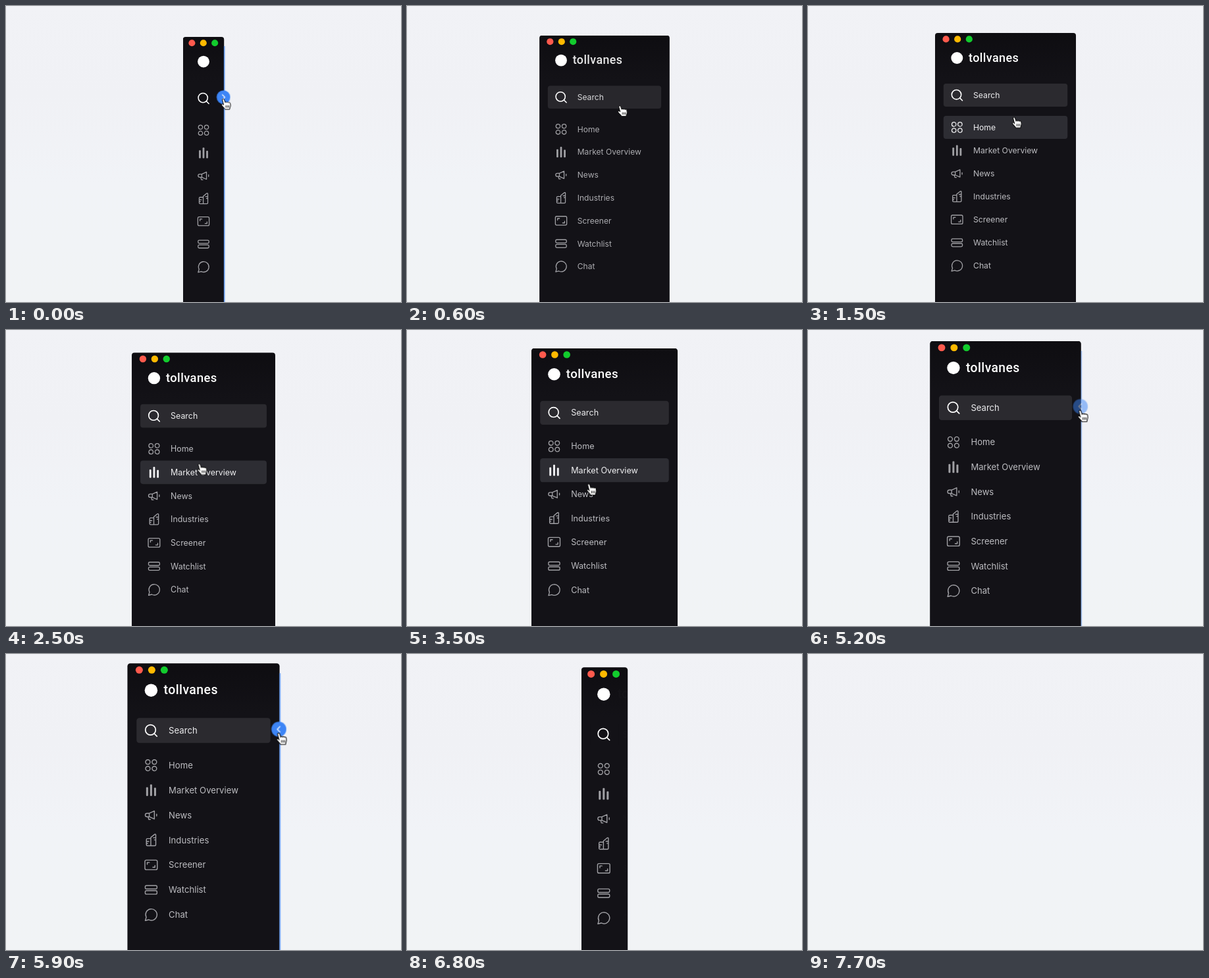
Write an HTML page that moves like this. It is 600 px wide and 450 px high and loops after 8 s.

```html
<!DOCTYPE html>
<html lang="en">
<head>
<meta charset="utf-8">
<title>Collapsible sidebar</title>
<style>
/* --p: how far the sidebar is open, --h: how strongly a row is hovered */
@property --p { syntax: '<number>'; inherits: true; initial-value: 0; }
@property --h { syntax: '<number>'; inherits: true; initial-value: 0; }

html, body { margin: 0; width: 100%; height: 100%; overflow: hidden; }
body { background: linear-gradient(#f1f2f6, #f0f1f5 30%, #f1f3f7 60%, #f1f3f5); }
svg { display: block; width: 600px; height: 450px; animation: open 8s infinite; }
.drop { animation: drop 8s infinite; }
.cam { animation: cam 8s linear infinite; }
.side { transform: translateX(calc(-1px * (31.6 + 75.4 * var(--p)))); }
.panel { width: calc(1px * (63.2 + 150.8 * var(--p))); height: 700px; }
.lights { transform: translateX(calc(1px * (13.8 + 2.8 * var(--p)))); }
.icon { transform: translateX(calc(1px * (31.6 + 1.7 * var(--p)))); }
.line { fill: none; stroke: currentColor; stroke-width: 1.3; stroke-linecap: round; stroke-linejoin: round; }
.solid { fill: currentColor; }
text { fill: currentColor; font: 400 12.2px Inter, 'Open Sans', sans-serif; opacity: var(--p); }
.brand { font: 500 18px Roboto, 'Liberation Sans', sans-serif; letter-spacing: .4px; }
.bar { x: 12.8px; y: -17.5px; width: calc(1px * (37.6 + 150.8 * var(--p))); height: 35px; rx: 4px; fill: #2b2a2f; opacity: var(--p); }
.row { transform: translateY(var(--y)); color: #bcbcc0; }
.row .bar { fill: #2d2d33; opacity: calc(var(--h) * var(--p)); }
.row .icon { opacity: calc(.84 + .16 * var(--h)); }
.search { transform: translateY(94.5px); color: #fff; }
.search text { fill: #ececee; }
.home { animation: home 8s linear infinite; }
.market { animation: market 8s linear infinite; }
.news { animation: news 8s linear infinite; }
.edge { transform: translateX(calc(1px * (62.2 + 150.8 * var(--p)))); animation: edge 8s linear infinite; }
.chevron { animation: flip 8s step-end infinite; }
.hand { animation: hand 8s ease-in-out infinite; }

@keyframes open {
  0%, 1.25% { --p: 0; animation-timing-function: ease; }
  11.25%, 76.6% { --p: 1; animation-timing-function: ease; }
  86.6%, 100% { --p: 0; }
}
@keyframes drop {
  0%, 83.125% { transform: translateY(0); animation-timing-function: cubic-bezier(.65, 0, .35, 1); }
  97.5%, 100% { transform: translateY(440px); }
}
@keyframes cam {
  0% { transform: translate(300px, 47px) scale(.988); }
  11.25% { transform: translate(300px, 43.8px) scale(.9945); }
  18.75% { transform: translate(300px, 41px) scale(1); }
  22.5% { transform: translate(300px, 38.5px) scale(1.006); }
  33.75% { transform: translate(300px, 33.3px) scale(1.022); }
  43.75% { transform: translate(300px, 27.8px) scale(1.038); }
  57.5% { transform: translate(300px, 20px) scale(1.0638); }
  67.5% { transform: translate(300px, 15.7px) scale(1.076); }
  73.75% { transform: translate(300px, 14.2px) scale(1.08); }
  80% { transform: translate(300px, 13.4px) scale(1.08); }
  85%, 100% { transform: translate(300px, 13.2px) scale(1.077); }
}
@keyframes home {
  0%, 9% { --h: 0; color: #bcbcc0; }
  11%, 24% { --h: 1; color: #f0f0f2; }
  26%, 100% { --h: 0; color: #bcbcc0; }
}
@keyframes market {
  0%, 25% { --h: 0; color: #bcbcc0; }
  27%, 44.3% { --h: 1; color: #f0f0f2; }
  46%, 100% { --h: 0; color: #bcbcc0; }
}
@keyframes news {
  0%, 45% { --h: 0; color: #bcbcc0; }
  46.5%, 57.8% { --h: 1; color: #f0f0f2; }
  59.5%, 100% { --h: 0; color: #bcbcc0; }
}
@keyframes edge {
  0%, 3% { opacity: 1; }
  6%, 64% { opacity: 0; }
  66%, 76.6% { opacity: 1; }
  80%, 100% { opacity: 0; }
}
@keyframes flip {
  0% { transform: scaleX(1); }
  10%, 100% { transform: scaleX(-1); }
}
@keyframes hand {
  0%, 2% { transform: translate(330px, 141.5px) scale(.99); }
  14% { transform: translate(314px, 166px) scale(1); animation-timing-function: linear; }
  18.75% { transform: translate(313px, 169.5px) scale(1); animation-timing-function: ease-in; }
  25% { transform: translate(306px, 185px) scale(1.01); animation-timing-function: linear; }
  32% { transform: translate(292px, 206px) scale(1.02); animation-timing-function: linear; }
  40% { transform: translate(280px, 218px) scale(1.03); animation-timing-function: ease-in; }
  43.75% { transform: translate(276px, 234.5px) scale(1.04); animation-timing-function: ease-out; }
  47% { transform: translate(275px, 243px) scale(1.04); }
  53.5% { transform: translate(278px, 243px) scale(1.05); animation-timing-function: ease-in; }
  57.5% { transform: translate(370px, 201.5px) scale(1.06); animation-timing-function: ease-out; }
  66%, 76% { transform: translate(414px, 120.5px) scale(1.08); opacity: 1; }
  78.75% { transform: translate(408px, 124px) scale(1.08); opacity: 1; }
  82%, 100% { transform: translate(395px, 132px) scale(1.08); opacity: 0; }
}
</style>
</head>
<body>
<svg viewBox="0 0 600 450">
  <defs>
    <clipPath id="clip"><rect class="panel"/></clipPath>
    <linearGradient id="shade" gradientUnits="userSpaceOnUse" x1="0" y1="0" x2="0" y2="70">
      <stop stop-color="#0e0d11"/><stop offset="1" stop-color="#131217"/>
    </linearGradient>
  </defs>
  <g class="drop"><g class="cam"><g class="side">
    <rect class="panel" rx="4" fill="url(#shade)"/>
    <g clip-path="url(#clip)">
      <g class="lights">
        <circle cy="9.4" r="5.1" fill="#ff5a4d"/>
        <circle cx="17.6" cy="9.4" r="5.1" fill="#ffb900"/>
        <circle cx="35.2" cy="9.4" r="5.1" fill="#12cc2d"/>
      </g>
      <g color="#fff">
        <g class="icon"><circle class="solid" cy="38" r="9"/></g>
        <text class="brand" x="51" y="43.6">tollvanes</text>
      </g>
      <g class="search">
        <rect class="bar"/>
        <g class="icon line" style="stroke-width:1.6"><circle cx="-.8" cy="-.8" r="7.2"/><path d="M4.4 4.4 8.2 8.2"/></g>
        <text x="58" y="4.4">Search</text>
      </g>
      <g class="row home" style="--y:143.5px">
        <rect class="bar"/>
        <g class="icon line">
          <circle cx="-4.6" cy="-4.6" r="3.2"/><circle cx="4.6" cy="-4.6" r="3.2"/>
          <circle cx="-4.6" cy="4.6" r="3.2"/><circle cx="4.6" cy="4.6" r="3.2"/>
        </g>
        <text x="58" y="4.4">Home</text>
      </g>
      <g class="row market" style="--y:178.6px">
        <rect class="bar"/>
        <g class="icon solid">
          <rect x="-7" y="-4.3" width="2.8" height="12.5" rx="1"/>
          <rect x="-1.4" y="-8.2" width="2.8" height="16.4" rx="1"/>
          <rect x="4.2" y="-3.6" width="2.8" height="11.8" rx="1"/>
        </g>
        <text x="58" y="4.4">Market Overview</text>
      </g>
      <g class="row news" style="--y:213.7px">
        <rect class="bar"/>
        <g class="icon line">
          <path d="M-2.6 -2.6 4.6 -5.8V5.4L-2.6 2.3ZM-2.6 -2.6H-5.8a2.4 2.4 0 0 0 0 4.9H-2.6V-2.6M-4.2 2.5-3.2 6h2.2M7.8 -1.4V1.2"/>
        </g>
        <text x="58" y="4.4">News</text>
      </g>
      <g class="row" style="--y:248.7px">
        <g class="icon line">
          <path d="M-.4 8H-5.2q-1.4 0-1.4-1.4V-.6Q-6.6 -2-5.2 -2H-.4ZM-.4 8V-3.6L5 -8q1.6-.6 1.6 1V6.6Q6.6 8 5.2 8ZM-6.4 2h3.2M-6.4 4.8h1.6M6.4 -3.2H3.2M6.4 -.2H4.6"/>
        </g>
        <text x="58" y="4.4">Industries</text>
      </g>
      <g class="row" style="--y:283.7px">
        <g class="icon line">
          <rect x="-8.7" y="-6.7" width="17.4" height="13.4" rx="2"/>
          <path d="M-5.4 -.8V-3.4H-2.4M5.4 .8V3.4H2.4"/>
        </g>
        <text x="58" y="4.4">Screener</text>
      </g>
      <g class="row" style="--y:318.8px">
        <g class="icon line">
          <rect x="-8.3" y="-6" width="16.6" height="4.9" rx="1.8"/>
          <rect x="-8.3" y="1.2" width="16.6" height="4.9" rx="1.8"/>
        </g>
        <text x="58" y="4.4">Watchlist</text>
      </g>
      <g class="row" style="--y:353.9px">
        <g class="icon line"><path d="M-8.2 8.2-6.8 3.6A8 8 0 1 1-3.4 7Z"/></g>
        <text x="58" y="4.4">Chat</text>
      </g>
    </g>
    <g class="edge">
      <rect x=".8" y="14" width="1.4" height="690" fill="#4a8cf0"/>
      <g transform="translate(0 92.7)">
        <circle r="10.5" fill="#3d85f6"/>
        <path class="chevron line" color="#fff" d="M-1.6 -3.8 2.2 0-1.6 3.8"/>
      </g>
    </g>
  </g></g></g>
  <g class="hand">
    <path d="M-1.5 1C-1.5 -.7 1.2 -.7 1.6 .8L3 5.2C3.6 4.2 5.2 4.2 5.7 5.2 6.3 4.3 7.8 4.5 8.2 5.5 9 4.8 10.6 5.2 10.8 6.6 11.4 9 11.6 11 10.4 13L9.8 15.8H2.8C2.2 13.8-.5 12.2-2.3 9.6-3.2 8-1.5 7-.2 8L.6 8.8Z" fill="#fff" stroke="#000"/>
    <path d="M4.2 9.6v3.6M6.4 9.6v3.6M8.6 9.6v3.6" stroke="#000" stroke-width=".9"/>
  </g>
</svg>
</body>
</html>
```
